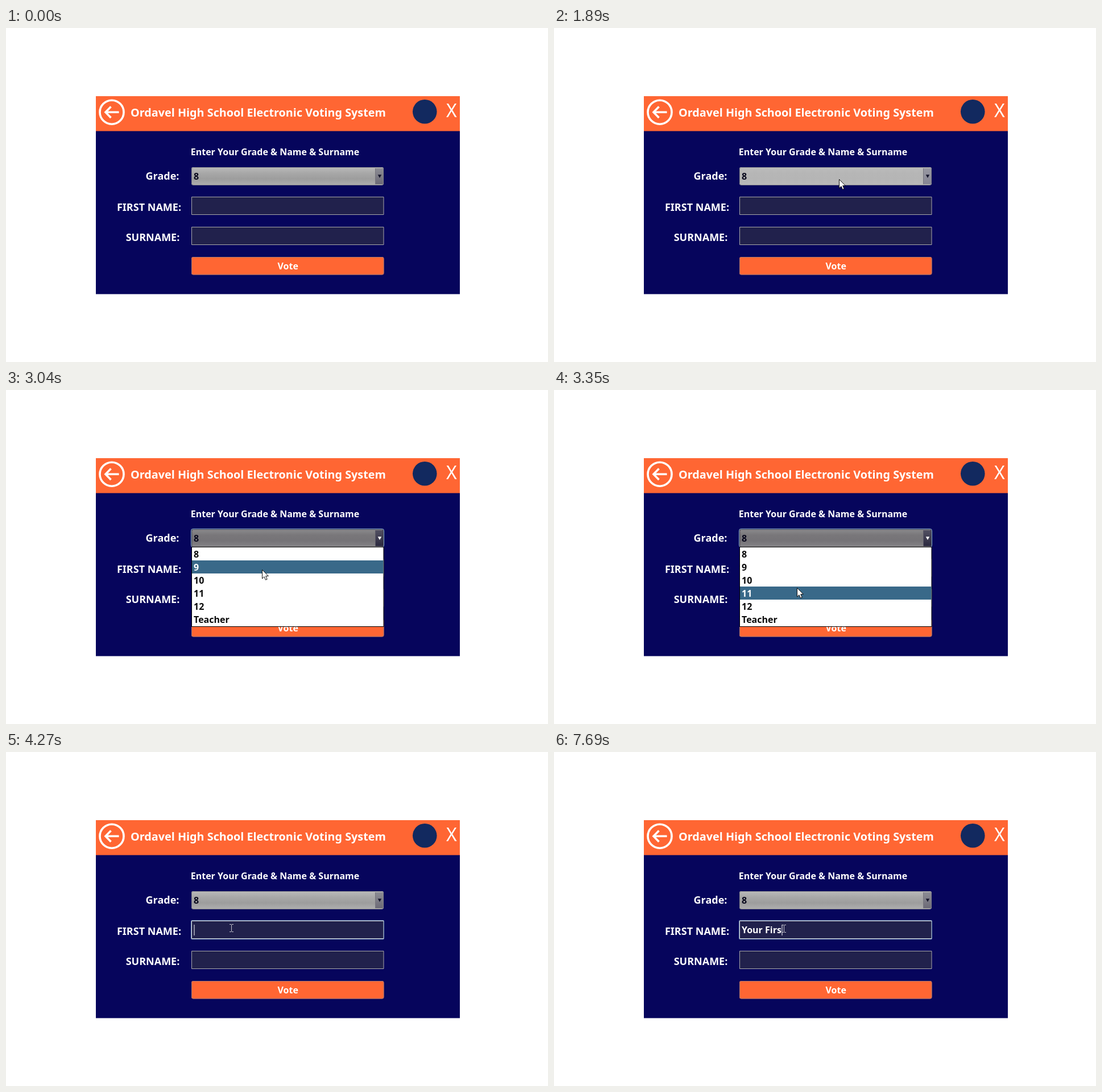
Write an HTML page with a canvas that moves like this. It is 953 px wide and 588 px high and loops after 8 s.

```html
<!DOCTYPE html>
<html lang="en">
<head>
<meta charset="utf-8">
<title>Voting form</title>
<style>
  html, body { margin: 0; width: 100%; height: 100%; overflow: hidden; background: #fff; }
  canvas { display: block; }
</style>
</head>
<body>
<canvas id="stage" width="953" height="588"></canvas>
<script>
const ctx = document.getElementById('stage').getContext('2d');
const LOOP = 8000, TICK = 76.5, ENTER = 750;
const OPEN = 1960, CLOSE = 4040, FOCUS = 4270;
const NAVY = '#06055c', ORANGE = '#ff6633';
const ITEMS = ['8', '9', '10', '11', '12', 'Teacher'];
const ROW = 22.9, LIST_TOP = 277;
const FIELDS = [297, 350];

// pointer path: time, x, y
const PATH = [
  [750, 897, 575], [1130, 720, 430], [1500, 590, 313], [1660, 545, 283],
  [1810, 506, 268], [1890, 501, 266], [2050, 501, 266], [2280, 484, 279],
  [2505, 469, 289.5], [2660, 468, 287], [2740, 468, 287], [3040, 450, 315],
  [3270, 431, 346], [3350, 427, 348], [3430, 420, 344], [3580, 403, 314],
  [3810, 399, 297], [4040, 399, 297], [4120, 398, 303], [4350, 395, 313.5],
  [4570, 395, 313.5], [4655, 403.5, 310.5]
];

// time and number of typed characters
const TYPED = [[5730, 1], [5960, 2], [6040, 3], [6440, 4], [6910, 5],
               [7140, 6], [7370, 7], [7440, 8], [7690, 9]];

const clamp = (v, lo, hi) => Math.min(hi, Math.max(lo, v));
const ramp = (t, from, to) => clamp((t - from) / (to - from), 0, 1);
const mix = (a, b, k) => a.map((v, i) => v + (b[i] - v) * k);
const rgb = c => `rgb(${c.map(Math.round).join(',')})`;

function rect(x, y, w, h, fill) {
  ctx.fillStyle = fill;
  ctx.fillRect(x, y, w, h);
}

function frame(x, y, w, h, color, radius = 0) {
  ctx.beginPath();
  ctx.roundRect(x + .5, y + .5, w - 1, h - 1, radius);
  ctx.lineWidth = 1;
  ctx.strokeStyle = color;
  ctx.stroke();
}

function text(str, x, y, size, { color = '#fff', align = 'left', weight = 'bold' } = {}) {
  ctx.font = `${weight} ${size}px "Noto Sans", "Open Sans", sans-serif`;
  ctx.textAlign = align;
  ctx.fillStyle = color;
  ctx.fillText(str, x, y);
}

function poly(points, close) {
  ctx.beginPath();
  points.forEach(([x, y]) => ctx.lineTo(x, y));
  if (close) ctx.closePath();
}

function pointerAt(t) {
  const time = ENTER + Math.floor((t - ENTER + 12) / TICK) * TICK;
  const next = PATH.findIndex(p => p[0] > time);
  if (next < 0) return PATH[PATH.length - 1].slice(1);
  if (next === 0) return PATH[0].slice(1);
  const a = PATH[next - 1], b = PATH[next];
  return mix(a.slice(1), b.slice(1), (time - a[0]) / (b[0] - a[0]));
}

function drawHeader() {
  rect(158, 120, 640, 348.5, NAVY);
  rect(158, 120, 640, 61.5, ORANGE);
  ctx.strokeStyle = '#fff';
  ctx.lineWidth = 3.6;
  ctx.beginPath();
  ctx.arc(186, 148.2, 21, 0, Math.PI * 2);
  ctx.stroke();
  poly([[184.5, 138.5], [175, 148.2], [184.5, 158]]);
  ctx.stroke();
  poly([[175, 148.2], [198.5, 148.2]]);
  ctx.stroke();
  text('Ordavel High School Electronic Voting System', 219, 156, 19.8);
  ctx.fillStyle = '#12295f';
  ctx.beginPath();
  ctx.arc(736.3, 147.3, 21.3, 0, Math.PI * 2);
  ctx.fill();
  text('X', 783.3, 157, 32, { align: 'center', weight: 'normal' });
}

function drawLabels() {
  text('Enter Your Grade & Name & Surname', 473, 224, 16, { align: 'center' });
  text('Grade:', 275, 267, 18, { align: 'center' });
  text('FIRST NAME:', 251.5, 322, 18, { align: 'center' });
  text('SURNAME:', 258, 375, 18, { align: 'center' });
}

function verticalFill(top, height, colors) {
  const g = ctx.createLinearGradient(0, top, 0, top + height);
  colors.forEach((c, i) => g.addColorStop(i / (colors.length - 1), rgb(c)));
  return g;
}

const grey = (...levels) => levels.map(v => [v, v, v]);
const COMBO = {
  normal: { body: grey(186, 168, 157, 174), button: [[140, 140, 148], [108, 106, 118]] },
  hover:  { body: grey(188, 182, 181, 186), button: [[152, 152, 162], [134, 134, 148]] },
  open:   { body: [[140, 140, 142], [121, 119, 122], [117, 115, 119], [132, 131, 134]],
            button: [[82, 80, 98], [42, 40, 62]] }
};

function drawCombo(t, isOpen) {
  const hover = ramp(t, 1640, 1810);
  const fade = ramp(t, CLOSE, 4230);
  const [from, to, k] = isOpen ? [COMBO.open, COMBO.open, 0]
    : t < OPEN ? [COMBO.normal, COMBO.hover, hover]
    : [COMBO.open, COMBO.normal, fade];
  const blend = part => from[part].map((c, i) => mix(c, to[part][i], k));

  ctx.beginPath();
  ctx.roundRect(326, 245, 338, 31.5, 3);
  ctx.fillStyle = verticalFill(245, 31, blend('body'));
  ctx.fill();
  rect(650, 247, 13, 28, verticalFill(247, 28, blend('button')));
  rect(649, 247, 1, 28, isOpen ? '#5c5a68' : '#77767e');
  frame(326, 245, 338, 32, isOpen ? '#37374d' : '#85858a', 3);
  if (t >= OPEN && t < FOCUS) frame(325, 244, 340, 33, '#8db3cf', 3);

  ctx.fillStyle = isOpen ? '#fff' : '#15152b';
  poly([[653.8, 258.3], [660.2, 258.3], [657, 264]], true);
  ctx.fill();
  text('8', 330, 267, 16, { color: '#08081c' });
}

function drawField(y, focused) {
  rect(326, y, 338, 32, '#21214c');
  frame(326, y, 338.5, 32, focused ? '#d3d6dc' : '#aaaaa9');
  if (focused) frame(325, y - 1, 340, 34, '#7795b9', 1);
}

function drawTyping(t) {
  const key = TYPED.filter(k => t >= k[0]).pop();
  const str = 'Your First'.slice(0, key ? key[1] : 0);
  text(str, 330, 319, 16);
  const caretOn = key || t < 4810 || t >= 5270;
  if (caretOn) rect(Math.round(330.6 + ctx.measureText(str).width) - .5, 304, 1, 19, '#fff');
}

function drawButton() {
  ctx.beginPath();
  ctx.roundRect(326, 403, 338.5, 31.5, 3);
  ctx.fillStyle = ORANGE;
  ctx.fill();
  frame(326, 403, 338.5, 31.5, '#a87870', 3);
  text('Vote', 495.7, 425, 16, { align: 'center' });
}

function drawList(pointerY) {
  const active = clamp(Math.floor((pointerY - LIST_TOP) / ROW), 0, ITEMS.length - 1);
  rect(326, 276, 338.5, 141, '#000');
  rect(327, LIST_TOP, 336.5, 139, '#fff');
  ITEMS.forEach((item, i) => {
    const top = Math.round(LIST_TOP + i * ROW);
    if (i === active) rect(327, top, 336.5, 23, '#396989');
    text(item, 330, top + 18, 16, { color: i === active ? '#fff' : '#0a0a0a' });
  });
}

function drawPointer([x, y], isOpen) {
  const overField = !isOpen && x > 326 && x < 664 &&
    FIELDS.some(top => y > top && y < top + 32);
  if (overField) {
    x = Math.round(x);
    y = Math.round(y);
    rect(x, y - 6, 1, 12, '#c4c4cc');
    for (const end of [y - 7, y + 6]) {
      rect(x - 3, end, 3, 1, '#c4c4cc');
      rect(x + 1, end, 3, 1, '#c4c4cc');
    }
    return;
  }
  ctx.save();
  ctx.translate(Math.round(x) + .5, Math.round(y) + .5);
  poly([[0, 0], [0, 15.5], [3.5, 12.2], [6, 17.8], [8.6, 16.7], [6.2, 11.2], [10.8, 11]], true);
  ctx.fillStyle = '#fff';
  ctx.fill();
  ctx.lineWidth = 1;
  ctx.strokeStyle = '#111';
  ctx.stroke();
  ctx.restore();
}

function render(t) {
  const isOpen = t >= OPEN && t < CLOSE;
  const pointer = pointerAt(t);
  rect(0, 0, 953, 588, '#fff');
  drawHeader();
  drawLabels();
  drawCombo(t, isOpen);
  drawField(FIELDS[0], t >= FOCUS);
  drawField(FIELDS[1], false);
  drawButton();
  if (t >= FOCUS) drawTyping(t);
  if (isOpen) drawList(pointer[1]);
  if (t >= ENTER) drawPointer(pointer, isOpen);
}

const start = performance.now();
function loop() {
  render((performance.now() - start) % LOOP);
  requestAnimationFrame(loop);
}
loop();
</script>
</body>
</html>
```
